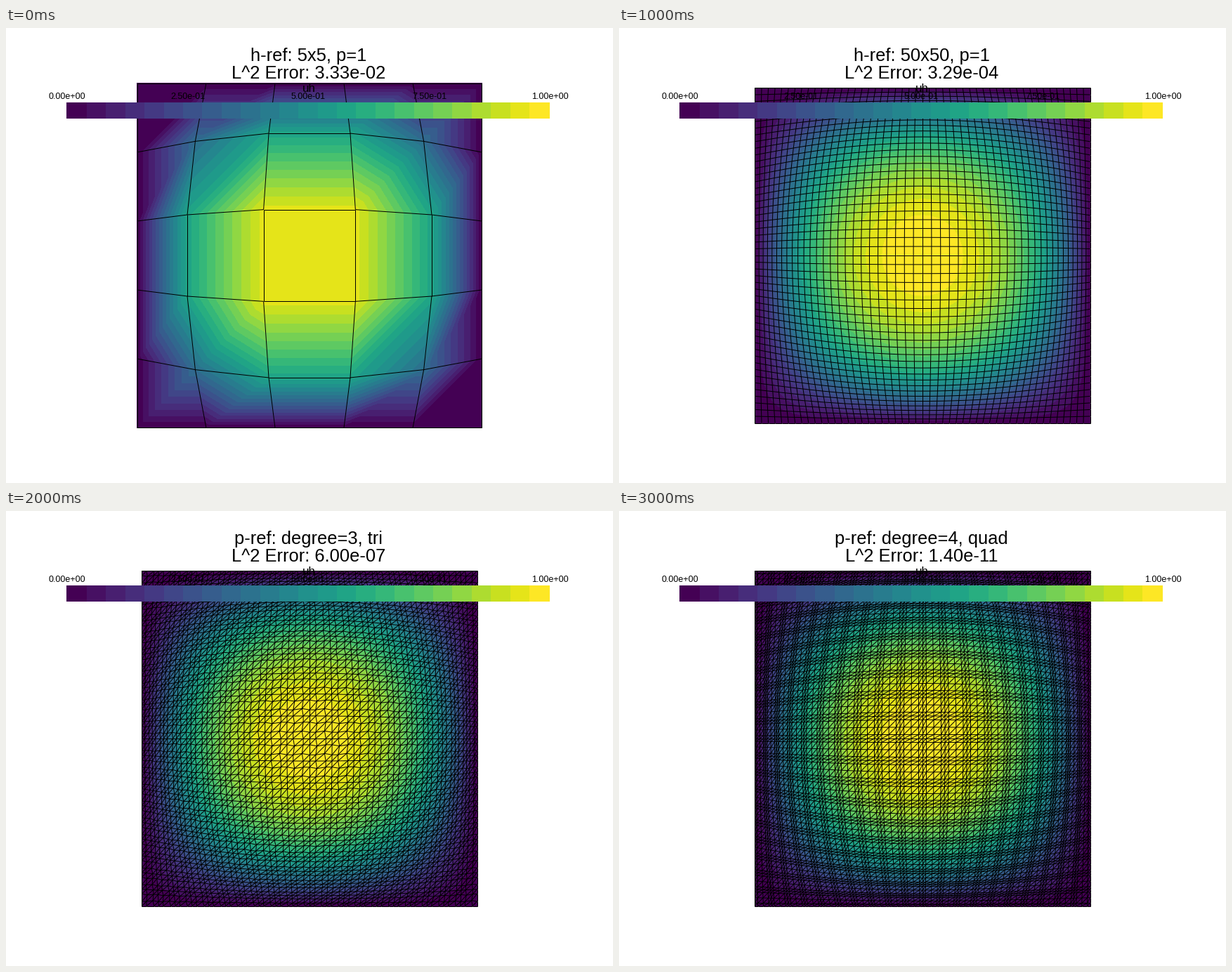
A matplotlib script that plays this animation: 864 by 648 pixels, repeating every 3.5 s.

```python
import math

import matplotlib.pyplot as plt
import numpy as np
from matplotlib.animation import ArtistAnimation
from matplotlib.collections import LineCollection
from matplotlib.patches import Rectangle
from matplotlib.tri import Triangulation
from numpy.polynomial.legendre import Legendre

W, H, DPI = 864, 648, 100
PX = 72 / DPI            # points per pixel
ZOOM = 1835              # pixels per unit at camera distance 1
BINS = 25
COLORS = plt.get_cmap("viridis")(np.linspace(0, 1, BINS))

plt.rcParams["font.family"] = "Liberation Sans"
fig = plt.figure(figsize=(W / DPI, H / DPI), dpi=DPI, facecolor="white")
ax = fig.add_axes([0, 0, 1, 1])
ax.set_xlim(0, W)
ax.set_ylim(H, 0)
ax.axis("off")
ax.set_autoscale_on(False)


def lobatto(n):
    """Gauss-Lobatto points on [0, 1]."""
    inner = np.sort(np.real(Legendre.basis(n).deriv().roots())) if n > 1 else []
    return (np.concatenate([[-1], inner, [1]]) + 1) / 2


def warped(idx):
    """Recursively warped barycentric coordinates of a lattice index."""
    if len(idx) == 1:
        return np.ones(1)
    n = sum(idx)
    nodes = lobatto(n)
    out = np.zeros(len(idx))
    total = 0
    for i, k in enumerate(idx):
        weight = nodes[n - k]
        if n == k:
            continue
        rest = [j for j in range(len(idx)) if j != i]
        out[rest] += weight * warped([idx[j] for j in rest])
        total += weight
    return out / total


def quad_mesh(cells, degree=1):
    """Grid points, triangles and the grid-line segments."""
    step = lobatto(degree)[:-1]
    t = np.append((np.arange(cells)[:, None] + step).ravel(), cells) / cells
    m = len(t)
    x, y = (a.ravel() for a in np.meshgrid(t, t))
    ids = np.arange(m * m).reshape(m, m)
    a, b = ids[:-1, :-1].ravel(), ids[:-1, 1:].ravel()
    d, c = ids[1:, :-1].ravel(), ids[1:, 1:].ravel()
    tris = np.vstack([np.c_[a, b, c], np.c_[a, c, d]])
    rows = np.c_[ids[:, :-1].ravel(), ids[:, 1:].ravel()]
    cols = np.c_[ids[:-1].ravel(), ids[1:].ravel()]
    edges = np.vstack([rows, cols]) if degree == 1 else None
    return x, y, tris, edges


def tri_mesh(cells, degree):
    """Right-diagonal triangle mesh, each cell split into its node lattice."""
    n = degree
    lattice = [(i, j) for i in range(n + 1) for j in range(n + 1 - i)]
    index = {ij: k for k, ij in enumerate(lattice)}
    bary = np.array([warped([n - i - j, i, j]) for i, j in lattice])
    local = []
    for i, j in lattice:
        if i + j < n:
            local.append([index[i, j], index[i + 1, j], index[i, j + 1]])
        if i + j < n - 1:
            local.append([index[i + 1, j], index[i + 1, j + 1], index[i, j + 1]])
    local = np.array(local)

    points, tris = [], []
    for corners in ([(0, 0), (1, 0), (1, 1)], [(0, 0), (0, 1), (1, 1)]):
        shape = bary @ np.array(corners)
        for cx in range(cells):
            for cy in range(cells):
                tris.append(local + len(points) * len(lattice))
                points.append((shape + (cx, cy)) / cells)
    points = np.round(np.vstack(points), 7)
    unique, inverse = np.unique(points, axis=0, return_inverse=True)
    return unique[:, 0], unique[:, 1], inverse.ravel()[np.vstack(tris)], None


def surface(mesh, peak):
    """The warped solution seen from above through a perspective camera."""
    x, y, tris, edges = mesh
    u = peak * np.sin(np.pi * x) * np.sin(np.pi * y)
    top = u.max()
    radius = math.sqrt(2 + top ** 2) / 2
    dist = radius / math.sin(math.radians(15)) + top / 2

    def depth(v):
        return 1 / (1 - v / dist)

    q = depth(u)
    sx = W / 2 + ZOOM / dist * (x - 0.5) * q
    sy = H / 2 - ZOOM / dist * (y - 0.5) * q
    grid = Triangulation(sx, sy, tris)
    levels = np.linspace(0, 1, BINS + 1)
    levels[0], levels[-1] = -0.01, 1.01
    # 1/w is linear on screen, so banding it keeps the perspective exact
    bands = ax.tricontourf(grid, q, levels=depth(levels), colors=COLORS, zorder=1)
    if edges is None:
        edges = grid.edges
    lines = LineCollection(np.stack([sx, sy], axis=1)[edges], colors="black",
                           linewidths=1 * PX, capstyle="butt", zorder=2)
    ax.add_collection(lines, autolim=False)
    return [bands, lines]


def label(x, y, text, size):
    return ax.text(x, y, text, fontsize=size * PX, color="black",
                   ha="center", va="baseline", zorder=5)


def scalar_bar():
    cuts = np.concatenate([[86], np.linspace(115, 745, BINS - 1), [774]])
    for left, right, color in zip(cuts[:-1], cuts[1:], COLORS):
        ax.add_patch(Rectangle((left, 105.5), right - left, 23.5, fc=color,
                               ec="none", antialiased=False, zorder=4))
    for k in range(5):
        label(86.5 + 172 * k, 101, f"{k / 4:.2e}", 12.5)
    label(431, 91, "uh", 17)


def scene(title, error, mesh):
    return surface(mesh, 1 + error) + [
        label(430.5, 47.5, title, 25.5),
        label(430.5, 71.5, f"L^2 Error: {error:.2e}", 25.5),
    ]


scalar_bar()
scenes = [scene(f"h-ref: {n}x{n}, p=1", err, quad_mesh(n))
          for n, err in [(5, 3.33e-2), (20, 2.06e-3), (50, 3.29e-4), (100, 8.22e-5)]]
scenes += [scene(f"p-ref: degree={p}, tri", err, tri_mesh(20, p))
           for p, err in [(3, 6.00e-7), (6, 2.10e-12)]]
scenes.append(scene("p-ref: degree=4, quad", 1.40e-11, quad_mesh(20, 4)))

anim = ArtistAnimation(fig, scenes, interval=500, repeat=True, repeat_delay=0)
plt.show()
```
